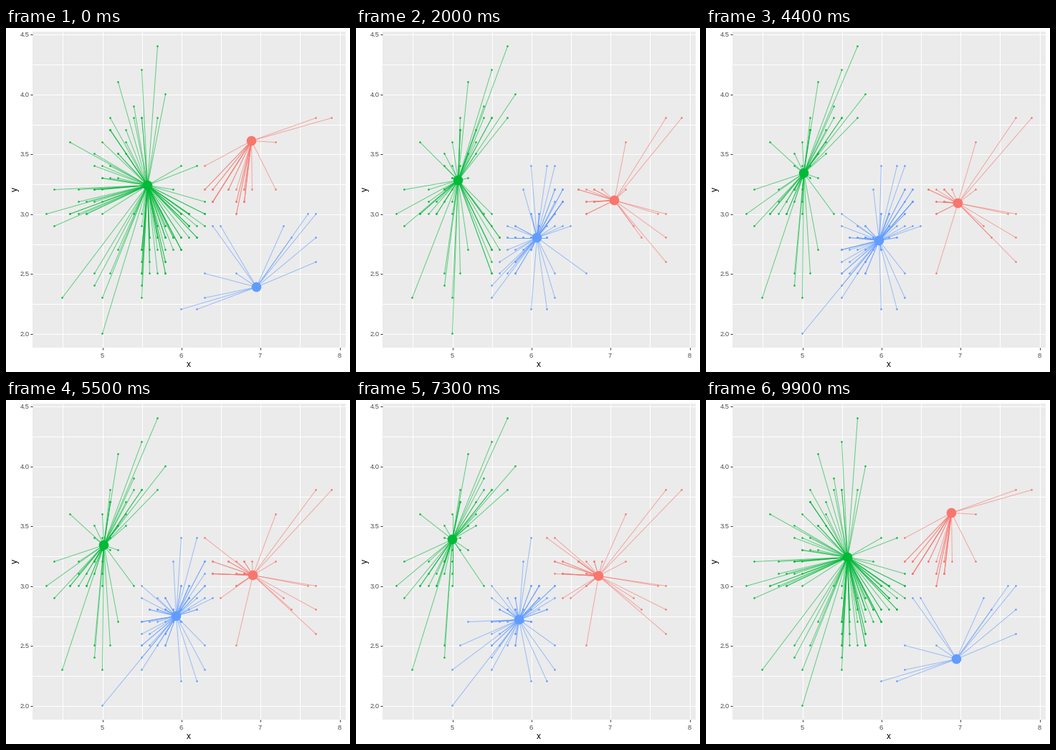
A matplotlib script for the animation above (10000 ms loop, 480 by 480 pixels).

```python
import numpy as np
import matplotlib.pyplot as plt
from matplotlib.animation import FuncAnimation
from matplotlib.collections import LineCollection
from matplotlib.colors import to_rgb
from matplotlib.patches import Rectangle

SIZE, DPI = 480, 100
PX = 72 / DPI  # points per pixel
LEFT, RIGHT, TOP, BOTTOM = 37, 474, 5, 446
COLORS = np.array([to_rgb(c) for c in ("#F8766D", "#00BA38", "#619CFF")])
rng = np.random.default_rng(5)

# outlying observations, in tenths
OUTER = [
    (50, 20), (60, 22), (62, 22), (45, 23), (50, 23), (55, 23), (63, 23),
    (49, 24), (55, 24), (49, 25), (51, 25), (63, 25), (67, 25), (77, 26),
    (52, 27), (74, 28), (77, 28), (44, 29), (73, 29), (43, 30), (54, 30),
    (76, 30), (77, 30), (44, 32), (59, 32), (72, 32), (60, 34), (62, 34),
    (63, 34), (46, 36), (72, 36), (57, 38), (77, 38), (79, 38), (54, 39),
    (58, 40), (52, 41), (55, 42), (57, 44),
]


def blob(n, rows, low, high):
    """Random lattice points, repeats allowed, between two slanted edges."""
    cells = [(x, y) for y in rows for x in range(40, 80)
             if low(y) <= x <= high(y)]
    return rng.choice(cells, n)


DATA = np.vstack([
    OUTER,
    blob(36, range(30, 39),
         lambda y: 27.8 + 0.6 * y, lambda y: 32.2 + 0.6 * y),
    blob(75, range(25, 33),
         lambda y: 63 if y > 30 else 55, lambda y: 13 + 1.8 * y),
]) / 10

# waypoints of the red, green and blue centres, by update number
UPDATES = [0, 1, 4, 6, 10, 16]
RED = [(6.89, 3.61), (6.75, 3.20), (7.05, 3.11),
       (7.03, 3.09), (6.91, 3.09), (6.82, 3.08)]
GREEN = [(5.57, 3.24), (5.31, 3.10), (5.08, 3.28),
         (5.02, 3.34), (5.02, 3.34), (5.00, 3.41)]
BLUE = [(6.95, 2.39), (6.77, 2.71), (6.07, 2.80),
        (6.00, 2.80), (5.94, 2.75), (5.80, 2.70)]

# frames each half step is held
HOLDS = [2] + [3] * 16 + [2] + [3] * 3 + [2] * 9 + [3, 17]
TIMELINE = [k for k, n in enumerate(HOLDS) for _ in range(n)] + [0]
TWEENED = {2, 7, 30}  # steps whose last frame is halfway to the next


def to_px(p):
    """Data coordinates to the centre of a pixel."""
    p = np.asarray(p, float)
    x = LEFT + (p[..., 0] - 4.12) * 110.35
    y = 259.3 - (p[..., 1] - 3) * 167
    return np.floor(np.stack([x, y], axis=-1)) + 0.5


def centers_at(update):
    return np.array([[np.interp(update, UPDATES, axis) for axis in zip(*path)]
                     for path in (RED, GREEN, BLUE)])


def nearest(centers):
    d = ((DATA[:, None] - centers[None]) ** 2).sum(axis=2)
    return d.argmin(axis=1)


def pose(k):
    """Odd steps move the centres, even steps reassign the points."""
    centers = centers_at((k + 1) // 2)
    labels = nearest(centers_at(k // 2))
    return centers, centers[labels], COLORS[labels]


fig = plt.figure(figsize=(SIZE / DPI, SIZE / DPI), dpi=DPI, facecolor="white")
ax = fig.add_axes([0, 0, 1, 1])
ax.set(xlim=(0, SIZE), ylim=(SIZE, 0))
ax.axis("off")


def rules(segs, color):
    ax.add_collection(LineCollection(segs, colors=color, linewidths=PX,
                                     capstyle="butt", zorder=1),
                      autolim=False)


def label(x, y, s, size, color, **kw):
    ax.text(x, y, s, fontsize=size * PX, color=color,
            family="Liberation Sans", **kw)


def col(v):
    return to_px((v, 3))[0]


def row(v):
    return to_px((5, v))[1]


ax.add_patch(Rectangle((LEFT, TOP), RIGHT - LEFT, BOTTOM - TOP,
                       facecolor="#EBEBEB", linewidth=0, zorder=0))
x_ticks, y_ticks = np.arange(5, 9), np.arange(2, 4.6, 0.5)
rules([[(col(v), TOP), (col(v), BOTTOM)] for v in np.arange(4.5, 8.1, 0.5)]
      + [[(LEFT, row(v)), (RIGHT, row(v))] for v in np.arange(2, 4.6, 0.25)],
      "white")
rules([[(col(v), BOTTOM), (col(v), BOTTOM + 3)] for v in x_ticks]
      + [[(LEFT - 3, row(v)), (LEFT, row(v))] for v in y_ticks], "#333333")
for v in x_ticks:
    label(col(v) - 0.5, 460, str(v), 9.4, "#4D4D4D",
          ha="center", va="baseline")
for v in y_ticks:
    label(33, row(v) + 3.4, f"{v:.1f}", 9.4, "#4D4D4D",
          ha="right", va="baseline")
label(255, 473, "x", 12, "black", ha="center", va="baseline")
label(13, 225, "y", 12, "black", ha="center", va="center", rotation=90)

spots = to_px(DATA)
links = LineCollection([], linewidths=PX, zorder=2)
ax.add_collection(links, autolim=False)


def dots(xy, diameter, colors, z):
    return ax.scatter(xy[:, 0], xy[:, 1], s=(diameter * PX) ** 2, c=colors,
                      linewidths=0, zorder=z)


points = dots(spots, 2.6, pose(0)[2], 3)
hubs = dots(to_px(centers_at(0)), 13.6, COLORS, 4)


def draw(i):
    k = TIMELINE[i]
    centers, ends, colors = pose(k)
    if k in TWEENED and TIMELINE[i + 1] != k:
        centers, ends, colors = (
            (a + b) / 2 for a, b in zip((centers, ends, colors), pose(k + 1)))
    links.set_segments(np.stack([spots, to_px(ends)], axis=1))
    links.set_color(np.column_stack([colors, np.full(len(colors), 0.6)]))
    points.set_facecolor(colors)
    hubs.set_offsets(to_px(centers))
    return links, points, hubs


anim = FuncAnimation(fig, draw, frames=len(TIMELINE), interval=100,
                     repeat=True, repeat_delay=0)
plt.show()
```
